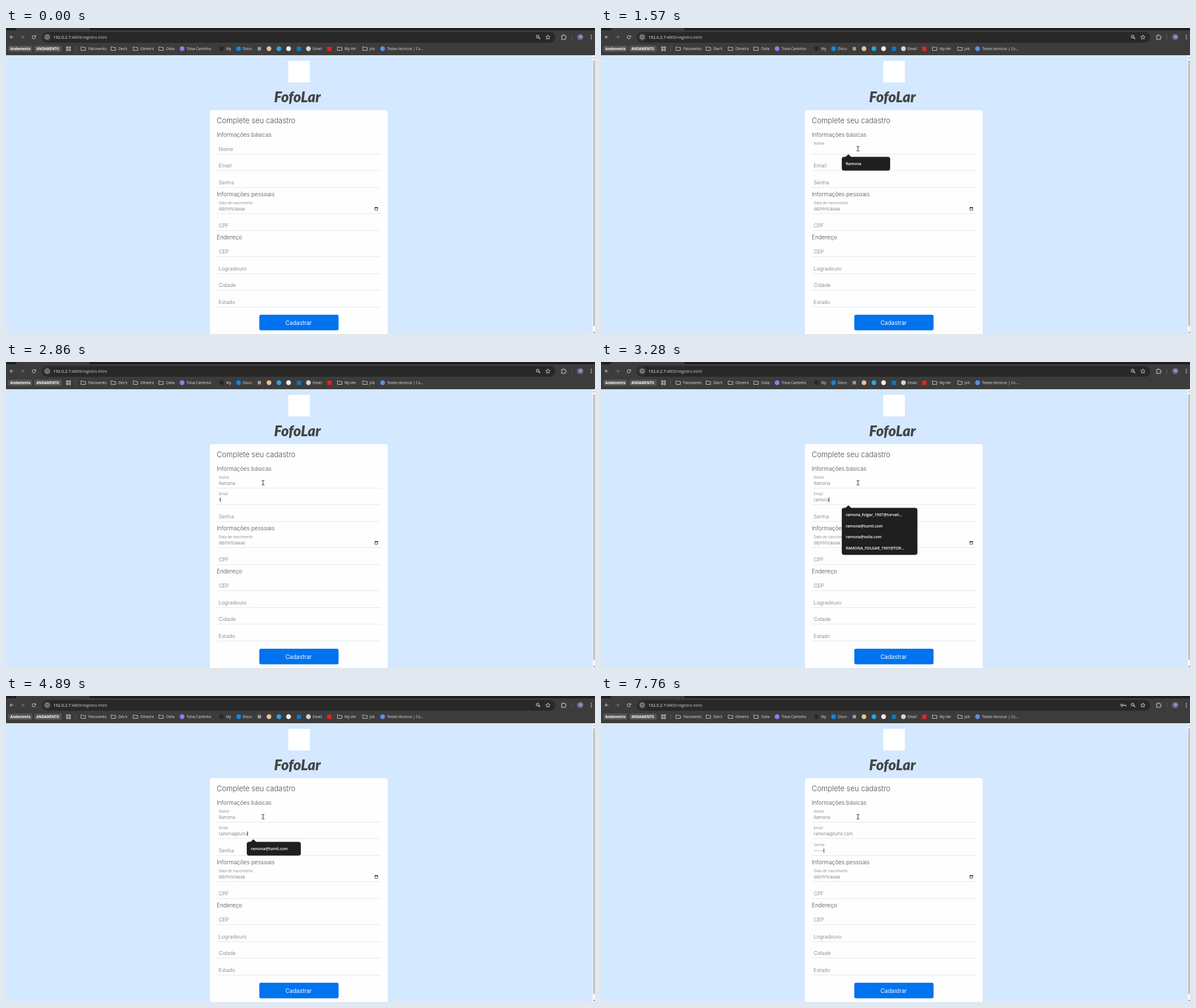
An HTML page with a canvas for the animation above (8 s loop, 1037 by 540 pixels).

```html
<!DOCTYPE html>
<html lang="pt-BR">
<head>
<meta charset="utf-8">
<title>Cadastro</title>
<style>
  html, body { margin: 0; width: 100%; height: 100%; overflow: hidden; background: #d4e8ff; }
  canvas { display: block; }
</style>
</head>
<body>
<canvas id="stage" width="1037" height="540"></canvas>
<script>
const ctx = document.getElementById('stage').getContext('2d');
const LOOP = 8000, STEP = 70;
const FORM = 'Inter, sans-serif', UI = '"Open Sans", "Noto Sans", sans-serif';
const ICON = '#d2d2d2';

// ---------- drawing helpers ----------
function text(str, x, y, size, color, family = FORM, weight = 400) {
  ctx.font = `${weight} ${size}px ${family}`;
  ctx.fillStyle = color;
  ctx.fillText(str, x, y);
}
function rect(x, y, w, h, color, r = 0) {
  ctx.fillStyle = color;
  ctx.beginPath();
  ctx.roundRect(x, y, w, h, r);
  ctx.fill();
}
function disc(x, y, r, color) {
  ctx.fillStyle = color;
  ctx.beginPath();
  ctx.arc(x, y, r, 0, 7);
  ctx.fill();
}
function ring(x, y, r, color = ICON, from = 0, to = Math.PI * 2) {
  ctx.strokeStyle = color;
  ctx.lineWidth = 1;
  ctx.beginPath();
  ctx.arc(x, y, r, from, to);
  ctx.stroke();
}
function line(points, color = ICON, width = 1, close = false) {
  ctx.strokeStyle = color;
  ctx.lineWidth = width;
  ctx.beginPath();
  points.forEach(([x, y]) => ctx.lineTo(x, y));
  if (close) ctx.closePath();
  ctx.stroke();
}
function polygon(points, color) {
  ctx.fillStyle = color;
  ctx.beginPath();
  points.forEach(([x, y]) => ctx.lineTo(x, y));
  ctx.closePath();
  ctx.fill();
}

// ---------- browser chrome ----------
function folder(x) {
  line([[x, 33.5], [x + 3, 33.5], [x + 4, 34.5], [x + 8, 34.5], [x + 8, 39.5], [x, 39.5]], ICON, 0.9, true);
}
function arrow(x, dir, color) {
  line([[x - 3 * dir, 16], [x + 3 * dir, 16]], color);
  line([[x, 13], [x - 3 * dir, 16], [x, 19]], color);
}
function toolbar(keyVisible) {
  rect(0, 0, 1037, 48, '#3c3c3c');
  rect(0, 0, 1037, 4, '#1f1f1f');
  rect(18, 0, 129, 4, '#3c3c3c');
  rect(63, 7, 904, 19, '#282828', 9.5);

  arrow(10, 1, ICON);
  arrow(29, -1, '#7c7c7c');
  ring(49, 16.3, 2.9, ICON, 0.2, 5.4);
  polygon([[52.6, 12.6], [52.6, 15.8], [49.6, 15.8]], ICON);

  disc(72.5, 16, 7, '#3c3c3c');
  ring(72.5, 16, 3.5);
  rect(72, 15.5, 1, 2.6, ICON);
  rect(72, 13.8, 1, 1, ICON);
  const host = '192.0.2.7';
  text(host, 83.5, 18.8, 7.2, '#f4f4f4', UI);
  text(':4800/registro.html', 83.5 + ctx.measureText(host).width, 18.8, 7.2, '#cfcfcf', UI);

  if (keyVisible) {
    ring(917, 16.3, 2.2);
    line([[919, 16.3], [924, 16.3], [924, 18.5]], ICON, 1.3);
    disc(917, 16.3, 0.7, ICON);
  }
  ring(936, 15.2, 2.6);
  line([[938, 17], [940.5, 19.5]], ICON, 1.2);
  line([[934.8, 15.2], [937.2, 15.2]], ICON, 0.8);
  const star = Array.from({ length: 10 }, (_, i) => {
    const a = -Math.PI / 2 + i * Math.PI / 5, r = i % 2 ? 1.9 : 4.2;
    return [954 + r * Math.cos(a), 16.4 + r * Math.sin(a)];
  });
  line(star, ICON, 0.9, true);
  line([[978, 13.5], [980, 13.5], [980.5, 12], [982, 12], [982.5, 13.5], [985, 13.5], [985, 15.5],
    [986.3, 16], [986.3, 17.3], [985, 18], [985, 20], [978, 20], [978, 18], [979, 17.5], [979, 16], [978, 15.5]], ICON, 1, true);
  rect(996, 12, 1, 9, '#56565a');
  disc(1011, 16, 5.6, '#5d668c');
  disc(1011.5, 15.5, 3, '#8c95c0');
  for (const y of [13, 16, 19]) disc(1030.5, y, 0.9, ICON);
}
function bookmarks() {
  rect(4, 31, 42, 11, '#555', 3);
  rect(50, 31, 48, 11, '#555', 3);
  text('Andamento', 7.5, 38.8, 6.1, '#fff', UI, 700);
  text('ANDAMENTO', 53.5, 38.8, 6.1, '#fff', UI, 700);
  for (const x of [106.5, 111]) for (const y of [33, 37.5]) {
    line([[x, y], [x + 2.6, y], [x + 2.6, y + 2.6], [x, y + 2.6]], ICON, 1, true);
  }
  rect(122, 32, 1, 9, '#606060');
  [132, 185, 224, 269, 583.5, 628].forEach(folder);

  const labels = [['Palcovento', 145], ["Dev's", 198], ['Olmeiro', 236.5], ['Ovlia', 282],
    ['Tolva Caminho', 318], ['My', 387.5], ['Disco', 417], ['Email', 540],
    ['My-Ver', 596], ['Job', 640], ['Testes técnicos | Co...', 671]];
  for (const [label, x] of labels) text(label, x, 38.7, 6.3, '#e4e4e4', UI);

  const dots = [[310, '#8f7cf0'], [379.5, '#292929'], [409.5, '#1187df'], [463, '#e5c197'],
    [480.5, '#2aa3e3'], [497.5, '#f0f0f0'], [532.5, '#d5d5d5'], [663, '#5a8fe8']];
  for (const [x, color] of dots) disc(x, 36.5, 4.2, color);
  rect(443, 33.5, 6, 6, '#9a9a9a');
  rect(512, 33, 7.5, 7.5, '#0a78c8');
  rect(565.5, 33, 7.5, 7.5, '#e8211d');
}

// ---------- page ----------
const VALUE_X = 374.5;
const fields = [
  { label: 'Nome', y: 222, focus: 960 },
  { label: 'Email', y: 251, focus: 2450 },
  { label: 'Senha', y: 281, focus: 5520 },
  { label: 'Data de nascimento', y: 327, focus: -LOOP },
  { label: 'CPF', y: 357 },
  { label: 'CEP', y: 403 },
  { label: 'Logradouro', y: 433 },
  { label: 'Cidade', y: 462 },
  { label: 'Estado', y: 492 }
];
const typed = [
  [[1640, 'R'], [1840, 'Ra'], [1910, 'Ram'], [1980, 'Ramo'], [2050, 'Ramon'], [2120, 'Ramona']],
  [[2860, 'r'], [2930, 'ra'], [3000, 'ram'], [3070, 'ramo'], [3140, 'ramon'], [3210, 'ramona'],
    [3560, 'ramona@'], [4020, 'ramona@y'], [4290, 'ramona@'], [4430, 'ramona@t'], [4500, 'ramona@tu'],
    [4570, 'ramona@tum'], [4690, 'ramona@tumi'], [4890, 'ramona@tumil'], [5020, 'ramona@tumil.'],
    [5160, 'ramona@tumil.co'], [5310, 'ramona@tumil.com']]
];
const passwordTimes = [6020, 6220, 6420, 6610, 6880, 7080, 7350, 7560, 7760];

const mails = ['ramona_folgar_1907@torvail...', 'ramona@tumil.com', 'ramona@ovlia.com',
  'RAMONA_FOLGAR_1907@TOR...', 'rute@ovlia.com'];
const popups = [
  { from: 1170, to: 2330, y: 227.5, w: 85, items: ['Ramona'], fadeIn: true, fadeOut: true },
  { from: 2930, to: 3140, y: 257.5, w: 133, items: mails, fadeIn: true },
  { from: 3140, to: 3560, y: 257.5, w: 133, items: mails.slice(0, 4) },
  { from: 3560, to: 4220, y: 257.5, w: 95, items: mails.slice(1, 3), fadeOut: true },
  { from: 4500, to: 5450, y: 257.5, w: 95, items: mails.slice(1, 2), fadeIn: true, fadeOut: true }
];

function page() {
  rect(0, 48, 1037, 492, '#d4e8ff');
  rect(497, 58, 38, 38, '#fff');
  text('FofoLar', 472, 131, 25.5, '#444', 'Lato, sans-serif', 'italic 900');

  rect(359, 145, 313, 420, '#fefefe', 4);
  const heading = (str, y, size) => text(str, 371, y, size, '#4c4c4c', FORM, 300);
  heading('Complete seu cadastro', 167.8, 12.9);
  heading('Informações básicas', 191.6, 10);
  heading('Informações pessoais', 296.9, 10);
  heading('Endereço', 372.9, 10);

  rect(446, 506, 139.5, 27.5, '#0073ee', 3);
  text('Cadastrar', 492, 523.8, 10, '#fff');

  rect(1033, 48, 4, 492, '#fafafa');
  rect(1034, 57, 2.5, 469, '#b4b4b4', 1.2);
  polygon([[1034, 53.5], [1037, 53.5], [1035.5, 51]], '#a0a0a0');
  polygon([[1034, 536.5], [1037, 536.5], [1035.5, 539]], '#666');
}

function valueAt(index, t) {
  if (index === 3) return 'dd/mm/aaaa';
  const hit = (typed[index] || []).filter(([time]) => time <= t).pop();
  return hit ? hit[1] : '';
}
function drawField(field, index, t, active) {
  const { label, y, focus = Infinity } = field;
  rect(371, y, 289, 1, '#dce9f3');
  const p = t < focus ? 0 : Math.min(1, (Math.floor((t - focus) / STEP) + 1) / 3);
  text(label, VALUE_X, y - 5 - 10.6 * p, 9.1 - 2.6 * p, '#70757a', FORM, 300);

  let end = VALUE_X;
  if (index === 2) {
    const count = passwordTimes.filter(time => time <= t).length;
    for (let i = 0; i < count; i++) rect(VALUE_X + 0.5 + i * 2, y - 8.5, 1, 1, '#777');
    end += count * 2;
  } else {
    const value = valueAt(index, t);
    text(value, VALUE_X, y - 4.7, index === 3 ? 7.9 : 7.65, '#6c6c6c', FORM, 300);
    end += ctx.measureText(value).width;
  }
  const blinkOff = t >= 1570 && t < 1640;
  if (active && !blinkOff) rect(Math.round(end - 0.5), y - 12, 1, 8, '#444');
}
function calendar() {
  line([[649.5, 317.5], [654.5, 317.5], [654.5, 321.5], [649.5, 321.5]], '#333', 0.8, true);
  rect(649, 316.5, 6, 1.5, '#222');
  rect(650, 316, 1, 1, '#222');
  rect(653, 316, 1, 1, '#222');
}

function drawPopup({ from, to, y, w, items, fadeIn, fadeOut }, t) {
  if (t < from || t >= to) return;
  const opening = fadeIn && t < from + STEP, closing = fadeOut && t >= to - STEP;
  const x = 424, h = 24 + 19.6 * (items.length - 1);
  ctx.save();
  if (opening || closing) {
    const k = 1 - 3.5 / w;
    ctx.globalAlpha = opening ? 0.5 : 0.17;
    ctx.translate(x + w / 2, y + h / 2);
    ctx.scale(k, k);
    ctx.translate(-x - w / 2, -y - h / 2);
  }
  ctx.fillStyle = '#1f1f1f';
  ctx.beginPath();
  ctx.roundRect(x, y, w, h, 4);
  ctx.moveTo(430, y + 0.5);
  ctx.lineTo(435.5, y - 4.5);
  ctx.lineTo(441, y + 0.5);
  ctx.shadowColor = closing ? 'transparent' : 'rgba(0,0,0,.3)';
  ctx.shadowBlur = 2;
  ctx.fill();
  ctx.shadowColor = 'transparent';
  if (closing) ctx.globalAlpha = 0.6;
  items.forEach((item, i) => text(item, 431, y + 14.7 + i * 19.6, 6.8, '#fff', UI, 600));
  ctx.restore();
}

// ---------- pointer ----------
function pointer(t) {
  if (t < 130) return;
  const p = Math.min(1, Math.floor((t - 130) / 69) / 11);
  const e = Math.sin(p * Math.PI / 2);
  const x = 998 - 546 * e, y = 531 - 318 * e;
  const overField = x > 371 && x < 660 && fields.some(f => y > f.y - 20 && y < f.y + 1);
  if (overField) {
    const cx = Math.round(x);
    rect(cx, y - 4, 1, 8, '#333');
    for (const end of [-4.5, 3.5]) {
      rect(cx - 2, y + end, 2, 1, '#333');
      rect(cx + 1, y + end, 2, 1, '#333');
    }
  } else {
    const shape = [[0, 0], [0, 9], [2.1, 7.1], [3.5, 10.2], [4.8, 9.6], [3.5, 6.6], [6.3, 6.4]]
      .map(([dx, dy]) => [x + dx, y + dy]);
    polygon(shape, '#fff');
    line(shape, '#222', 0.7, true);
  }
}

function draw(now) {
  const t = now % LOOP;
  page();
  const activeIndex = t >= 5520 ? 2 : t >= 2450 ? 1 : t >= 960 ? 0 : -1;
  fields.forEach((field, i) => drawField(field, i, t, i === activeIndex));
  calendar();
  popups.forEach(popup => drawPopup(popup, t));
  toolbar(t >= 6150);
  bookmarks();
  pointer(t);
}
function tick() {
  draw(performance.now());
  requestAnimationFrame(tick);
}
tick();
</script>
</body>
</html>
```
